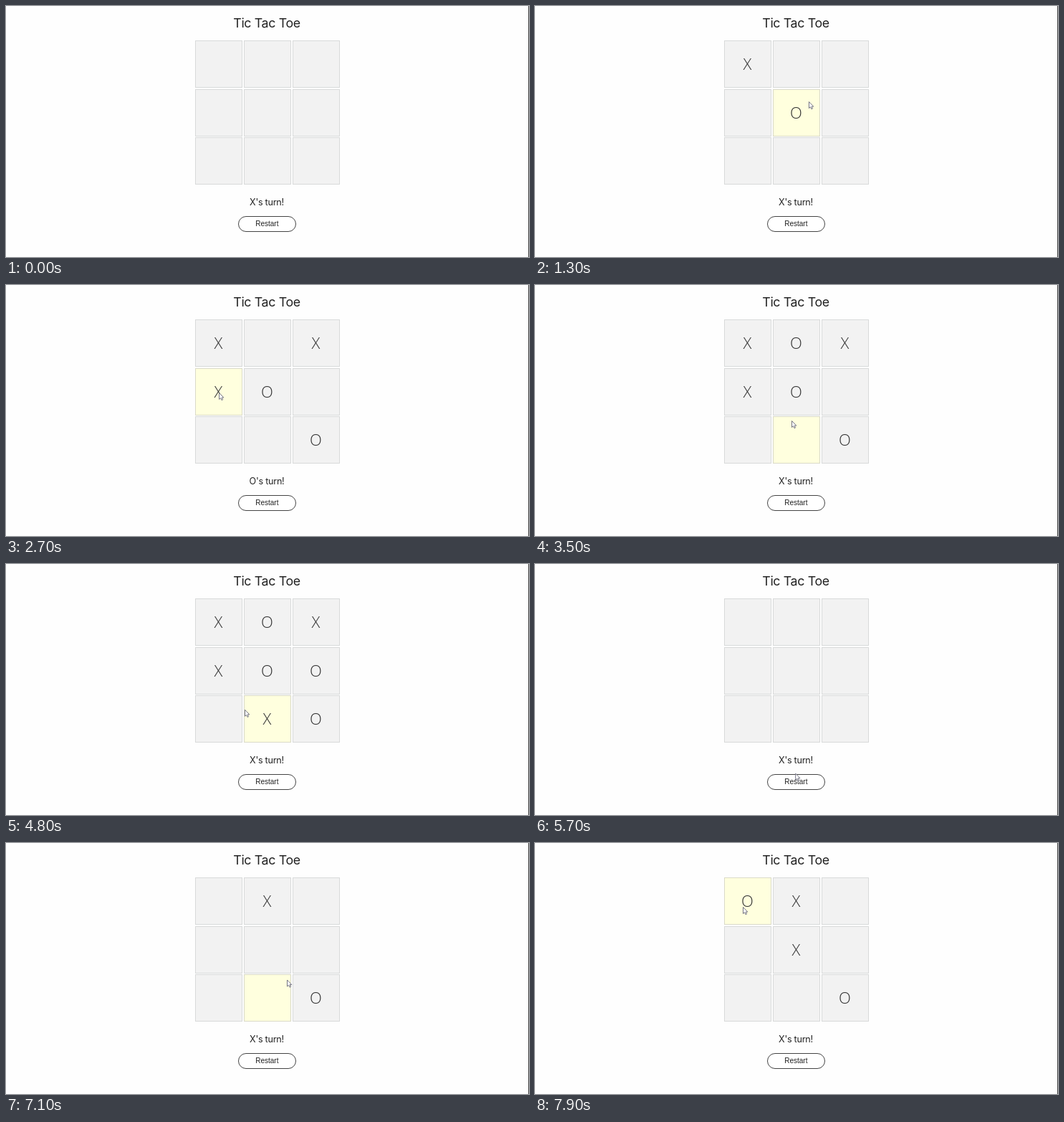
Write an HTML page that moves like this. It is 730x350 px and loops after 8 s.

```html
<!DOCTYPE html>
<html lang="en">
<head>
<meta charset="utf-8">
<title>Tic Tac Toe</title>
<style>
  html, body { margin: 0; width: 100%; height: 100%; overflow: hidden; background: #fefefe; }
  svg { display: block; }
  text { text-anchor: middle; fill: #222; font-family: Inter, "Open Sans", sans-serif; letter-spacing: -.02em; }
  .cell { fill: #f2f2f2; stroke: #d8dada; }
  .cell.hover { fill: #ffffde; stroke: #dadac8; }
  .mark { font: 300 22px "Open Sans", sans-serif; fill: #333; letter-spacing: 0; }
  .button { font: 400 10px "Liberation Sans", Arial, sans-serif; letter-spacing: 0; }
</style>
</head>
<body>
<svg width="730" height="350" viewBox="0 0 730 350">
  <text x="364" y="29.5" font-size="17.8">Tic Tac Toe</text>
  <g id="board"></g>
  <text id="status" x="364" y="278" font-size="12.6"></text>
  <rect x="324.5" y="293.5" width="80" height="21" rx="10.5" fill="#fff" stroke="#444"/>
  <text class="button" x="364.3" y="307">Restart</text>
  <path id="cursor" d="M0 0V9L2 7.2L3.5 10.2L5 9.5L3.6 6.6H6.3Z" fill="#fff" stroke="#667" stroke-width=".9"/>
  <path d="M729.5 0V350" stroke="#444"/>
</svg>
<script>
const LOOP = 8000, STEP = 100, SIZE = 65, ENTER = 200;
const RESTART = 9;

// Clicks: time, target (a cell index or the button)
const clicks = [
  [600, 0], [1100, 4], [1600, 2], [2100, 8], [2600, 3], [3100, 1], [3700, 7], [4300, 5], [5100, 6],
  [5600, RESTART], [6300, 1], [6900, 8], [7300, 4], [7800, 0]
];

// Three equal marks in a row, a column or a diagonal
const WIN = /^(?:...)*([XO])\1\1|([XO])..\2..\2|^([XO])...\3...\3|^..([XO]).\4.\4/;

const $ = id => document.getElementById(id);

function add(tag, attrs) {
  const el = document.createElementNS("http://www.w3.org/2000/svg", tag);
  for (const key in attrs) el.setAttribute(key, attrs[key]);
  return $("board").appendChild(el);
}

const cells = Array.from({ length: 9 }, (_, i) => {
  const x = 264.5 + i % 3 * 68;
  const y = Math.round(48 + Math.floor(i / 3) * 67.5) + 0.5;
  return {
    x, y,
    box: add("rect", { class: "cell", x, y, width: SIZE, height: SIZE }),
    mark: add("text", { class: "mark", x: x + 32, y: y + 40 })
  };
});

const spot = target => target === RESTART
  ? [364, 304]
  : [cells[target].x + 26, cells[target].y + 41];

// The pointer eases from one click to the next.
function pointerAt(t) {
  const next = clicks.findIndex(c => c[0] > t);
  const [t1, target] = clicks.at(next);
  const [t0, previous] = clicks[next - 1] || clicks[0];
  const k = next > 0 ? (t - t0) / (t1 - t0) : 1;
  const ease = k * k * (3 - 2 * k);
  const from = spot(previous);
  return spot(target).map((end, i) => from[i] + (end - from[i]) * ease);
}

function boardAt(t) {
  let board = Array(9).fill(" "), turn = 0;
  for (const [time, target] of clicks) {
    if (time > t) break;
    if (target === RESTART) {
      board.fill(" ");
      turn = 0;
    } else board[target] = "XO"[turn++ % 2];
  }
  return { board, turn };
}

function render(t) {
  const { board, turn } = boardAt(t);
  const [px, py] = pointerAt(t);
  const visible = t >= ENTER;

  cells.forEach(({ x, y, box, mark }, i) => {
    mark.textContent = board[i];
    box.classList.toggle("hover", visible && px >= x && px <= x + SIZE && py >= y && py <= y + SIZE);
  });

  const win = board.join("").match(WIN);
  $("status").textContent = win
    ? win.slice(1).find(Boolean) + " wins!"
    : "XO"[turn % 2] + "'s turn!";
  $("cursor").style.display = visible ? "" : "none";
  $("cursor").setAttribute("transform", `translate(${px} ${py})`);
}

function frame(now) {
  render(Math.floor(now % LOOP / STEP) * STEP);
  requestAnimationFrame(frame);
}
requestAnimationFrame(frame);
</script>
</body>
</html>
```
